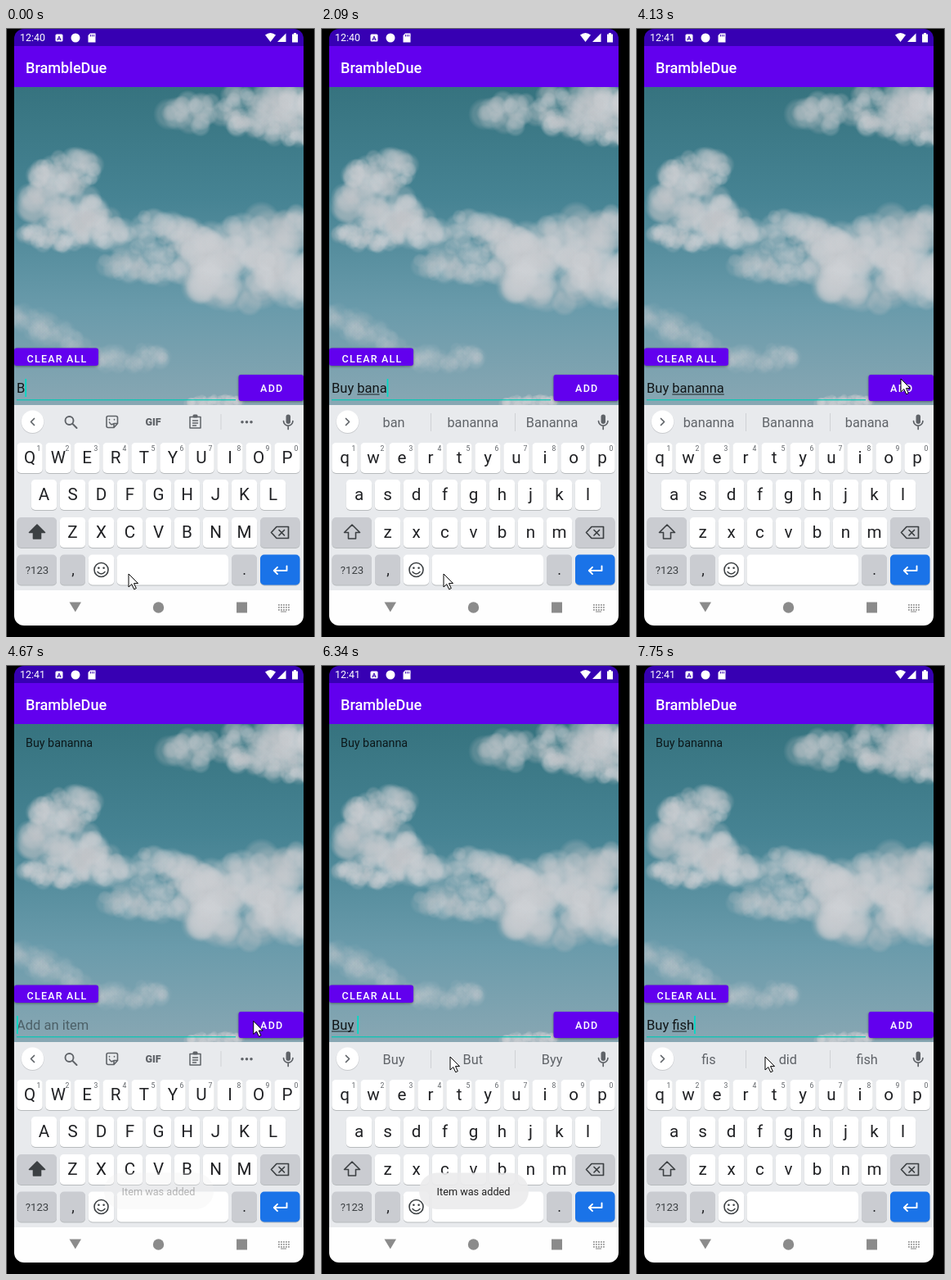
An HTML page with a canvas that plays this animation: 378 px wide and 743 px high, repeating every 8 s.

```html
<!DOCTYPE html>
<html lang="en">
<head>
<meta charset="utf-8">
<title>To-do list demo</title>
<style>
html, body { margin: 0; width: 100%; height: 100%; overflow: hidden; background: #000; }
canvas { display: block; width: 378px; height: 743px; }
</style>
</head>
<body>
<canvas id="stage"></canvas>
<script>
const W = 378, H = 743, LOOP = 8000;
const dpr = window.devicePixelRatio || 1;
const FONT = 'Roboto, "Open Sans", sans-serif';
const PURPLE = '#6200ee', TEAL = '#03dac5', INK = '#202124', DARK = '#3c4043', GREY = '#5f6368';

function setup(canvas) {
  canvas.width = W * dpr;
  canvas.height = H * dpr;
  const ctx = canvas.getContext('2d');
  ctx.scale(dpr, dpr);
  return ctx;
}
let c = setup(document.getElementById('stage'));

const clamp = v => Math.min(1, Math.max(0, v));
const ease = v => { v = clamp(v); return v * v * (3 - 2 * v); };

// Typing: each burst starts from a base text and adds one letter per step
const bursts = [
  { from: 0, step: 320, base: '', add: 'Buy ' },
  { from: 1400, step: 150, base: 'Buy ', add: 'B' },
  { from: 1700, step: 130, base: 'Buy ', add: 'bana' },
  { from: 2460, step: 150, base: 'Buy bana', add: 'nn' },
  { from: 3030, step: 150, base: 'Buy banann', add: 'a' },
  { from: 4400, step: 150, base: '', add: '' },
  { from: 5360, step: 150, base: '', add: 'B' },
  { from: 6040, step: 150, base: 'B', add: 'uy ' },
  { from: 7030, step: 240, base: 'Buy ', add: 'fish' }
];
const LAG = 130, ADDED = 4400;

function typed(t) {
  const b = bursts.findLast(b => b.from <= t);
  return b ? b.base + b.add.slice(0, 1 + Math.floor((t - b.from) / b.step)) : '';
}

// Suggestions: the word itself, then known words for its first letter
const known = {
  B: ['Buy', 'But', 'Byy'],
  b: ['bananna', 'Bananna', 'banana'],
  f: ['did', 'fish', 'for']
};
function suggest(value) {
  const word = value.split(' ').pop();
  if (!word) return ['a', 'milk', 'bananna'];
  return [word, ...known[word[0]].filter(w => w !== word)].slice(0, 3);
}

function rect(x, y, w, h, color) {
  c.fillStyle = color;
  c.fillRect(x, y, w, h);
}
function box(x, y, w, h, r, color) {
  c.beginPath();
  c.roundRect(x, y, w, h, r);
  c.fillStyle = color;
  c.fill();
}
function disc(x, y, r, color) {
  c.beginPath();
  c.arc(x, y, r, 0, 7);
  c.fillStyle = color;
  c.fill();
}
function ring(x, y, r, color, width) {
  c.beginPath();
  c.arc(x, y, r, 0, 7);
  c.strokeStyle = color;
  c.lineWidth = width;
  c.stroke();
}
function text(s, x, y, size, color, align = 'left', weight = 400, spacing = 0) {
  c.font = `${weight} ${size}px ${FONT}`;
  c.letterSpacing = spacing + 'px';
  c.textAlign = align;
  c.fillStyle = color;
  c.fillText(s, x, y);
  c.letterSpacing = '0px';
}
function fillPath(d, color) {
  c.fillStyle = color;
  c.fill(new Path2D(d));
}
function line(d, color, width = 1.7) {
  c.strokeStyle = color;
  c.lineWidth = width;
  c.stroke(new Path2D(d));
}

let seed = 7;
function random() {
  seed = seed * 16807 % 2147483647;
  return seed / 2147483647;
}

// Scatters soft puffs along a line, thinner towards its ends
function cloud(x0, y0, x1, y1, half, density) {
  const count = 14 * Math.hypot(x1 - x0, y1 - y0) / half;
  for (let i = 0; i < count; i++) {
    const u = random(), r = half * (.3 + .4 * random());
    const reach = half * (.35 + .65 * Math.sqrt(Math.sin(Math.PI * u))) - r * .6;
    const x = x0 + (x1 - x0) * u;
    const y = y0 + (y1 - y0) * u + (random() * 2 - 1) * Math.max(0, reach);
    const tone = 188 + 24 * random();
    const rgb = `${tone},${tone + 3},${tone + 7}`;
    const g = c.createRadialGradient(x, y, 0, x, y, r);
    g.addColorStop(0, `rgba(${rgb},${density})`);
    g.addColorStop(.7, `rgba(${rgb},${density * .8})`);
    g.addColorStop(1, `rgba(${rgb},0)`);
    disc(x, y, r, g);
  }
}

function paintSky() {
  const sheet = document.createElement('canvas'), stage = c;
  c = setup(sheet);
  const g = c.createLinearGradient(0, 72, 0, 460);
  g.addColorStop(0, '#36737f');
  g.addColorStop(.35, '#468393');
  g.addColorStop(.7, '#6a9bab');
  g.addColorStop(1, '#88a7b3');
  rect(0, 72, W, 388, g);
  cloud(200, 105, 390, 94, 30, .3);
  cloud(275, 112, 390, 132, 20, .2);
  cloud(35, 182, 110, 172, 27, .3);
  cloud(28, 212, 112, 222, 34, .33);
  cloud(22, 252, 95, 255, 20, .24);
  cloud(85, 240, 255, 262, 28, .26);
  cloud(120, 288, 260, 292, 24, .18);
  cloud(225, 272, 400, 248, 40, .36);
  cloud(232, 310, 400, 305, 38, .36);
  cloud(5, 350, 95, 388, 22, .09);
  cloud(95, 402, 195, 402, 18, .1);
  cloud(222, 458, 288, 455, 9, .3);
  c = stage;
  return sheet;
}
const sky = paintSky();

function bars(t) {
  rect(10, 0, 354, 22, '#3700b3');
  rect(10, 22, 354, 50, PURPLE);
  text(t < 2460 ? '12:40' : '12:41', 17, 16, 12.4, '#fff');
  box(60.5, 7.5, 9, 9, 1.5, '#fff');
  text('A', 65, 15, 8, '#3700b3', 'center', 700);
  disc(85, 12, 5.5, '#fff');
  fillPath('M103 6.5h6.5v11h-9v-8.5z', '#fff');
  line('M103.5 8v2.5M105.5 8v2.5M107.5 8v2.5', '#3700b3', .9);
  fillPath('M317 8.5Q323.5 3.5 330 8.5L323.5 17z', '#fff');
  fillPath('M332 17L342.5 6.5V17z', '#fff');
  fillPath('M350 7.5h2v-1.5h3v1.5h2v10h-7z', '#fff');
  text('BrambleDue', 24, 55, 18.1, '#fff', 'left', 500);
}

function button(label, x, y, w, h, base) {
  c.save();
  c.shadowColor = 'rgba(0,0,0,.4)';
  c.shadowBlur = 3 * dpr;
  c.shadowOffsetY = dpr;
  box(x, y, w, h, 3, PURPLE);
  c.restore();
  text(label, x + w / 2 + 1, base, 12.5, '#fff', 'center', 500, 1.2);
}

function field(t, value, seen) {
  const item = clamp((t - ADDED) / 250);
  text('Buy bananna', 24, 100, 14.3, `rgba(0,0,0,${item * .8})`);
  rect(13, 453, 268, 1.4, 'rgba(3,200,182,.85)');
  text(value || 'Add an item', 13, 445, 16.5, value ? 'rgba(0,0,0,.87)' : 'rgba(0,0,0,.42)');
  const width = s => c.measureText(s).width;
  if (value.startsWith(seen) && !seen.endsWith(' ')) {
    const start = width(seen.slice(0, seen.lastIndexOf(' ') + 1));
    rect(13 + start, 446.5, width(seen) - start, 1, 'rgba(0,0,0,.8)');
  }
  const idle = t > 3590 && t < ADDED;
  if (!idle) rect(13 + width(value), 428, 1.8, 22, TEAL);
}

function key(x, y, w, color = '#fff') {
  box(x, y + 1, w, 37, 5, 'rgba(60,64,67,.28)');
  box(x, y, w, 37, 5, color);
}

function letters(row, x, y, caps, digits) {
  [...row].forEach((ch, i) => {
    const mid = x + i * 35;
    key(mid - 15.7, y, 31.4);
    text(caps ? ch : ch.toLowerCase(), mid, y + 25, 20.6, INK, 'center');
    if (digits) text((i + 1) % 10, mid + 11, y + 10, 8.6, GREY, 'center');
  });
}

function toolbar() {
  ring(77.5, 479, 5, GREY, 1.9);
  line('M81.5 483L86.5 488', GREY, 2);
  line('M125 473.5h9.5q2 0 2 2v7l-4.5 5h-7q-2 0-2-2v-10q0-2 2-2zM136 482.5h-4v4.5M126.5 481q2 4 4.5 2M126.5 477.5v.5M132.5 477.5v.5', GREY, 1.6);
  text('GIF', 180, 484.5, 12.5, GREY, 'center', 900);
  line('M225 474.5h13v13.5h-13zM228.5 479h6M228.5 482h6M228.5 485h4', GREY, 1.5);
  box(228.5, 471.5, 6, 4, 1.5, GREY);
  rect(262.5, 471, 1, 19, '#cfd1d5');
  for (let i = -1; i < 2; i++) disc(294.5 + i * 5.5, 480.7, 1.8, GREY);
}

function keyboard(seen) {
  const caps = !seen, grey = '#caccd1';
  rect(10, 460, 354, 226, '#e8eaed');
  c.lineCap = c.lineJoin = 'round';
  disc(32.5, 481, 14, 'rgba(60,64,67,.18)');
  disc(32.5, 480.3, 13.7, '#fff');
  line(caps ? 'M34.5 476.5l-4 4 4 4' : 'M30.5 476.5l4 4-4 4', GREY);
  if (caps) toolbar();
  else suggest(seen).forEach((w, i) => {
    text(w, 89 + i * 96.8, 487, 16.3, GREY, 'center');
    if (i) rect(31 + i * 103, 470, 1, 22, '#cfd1d5');
  });
  box(342.5, 471.5, 5.5, 11.5, 2.75, GREY);
  line('M339.5 479.5a5.7 5.7 0 0 0 11.4 0M345.2 485.5v4', GREY);

  letters('QWERTYUIOP', 29, 506, caps, true);
  letters('ASDFGHJKL', 46.5, 551, caps);
  letters('ZXCVBNM', 81.5, 597, caps);

  key(13.5, 597, 48.5, grey);
  key(311, 597, 48.5, grey);
  key(13.5, 642.5, 48.5, grey);
  key(66, 642.5, 31, grey);
  key(100.8, 642.5, 31.4);
  key(135.5, 642.5, 136.5);
  key(276, 642.5, 31, grey);
  key(311, 642.5, 48.5, '#1a73e8');

  const shift = 'M38 606l9.5 9.5h-5v7.5h-9v-7.5h-5z';
  if (caps) fillPath(shift, DARK);
  line(shift, DARK, 1.6);
  line('M331 608.5h14.5v14h-14.5l-6.5-7zM334 612.5l6.5 6.5M340.5 612.5l-6.5 6.5', DARK);
  text('?123', 38, 665.5, 13.2, DARK, 'center');
  text(',', 82, 667, 18, INK, 'center');
  text('.', 291.5, 667, 18, INK, 'center');
  ring(116.5, 661, 8.5, DARK, 1.6);
  disc(113.4, 658.7, 1.3, DARK);
  disc(119.6, 658.7, 1.3, DARK);
  line('M112 663.5q4.5 5 9 0', DARK, 1.5);
  line('M343.5 656.5v5.5h-15.5M332 657.8l-4.2 4.2 4.2 4.2', '#fff', 1.9);
}

function navBar() {
  const tone = '#8b8b8b';
  rect(10, 686, 354, 43, '#fefefe');
  fillPath('M77.5 700.5h14.5l-7.2 12z', tone);
  disc(186.5, 707, 6.7, tone);
  rect(282, 700.5, 13, 13, tone);
  for (let i = 0; i < 15; i++) {
    rect(333 + i % 5 * 3, 703 + Math.floor(i / 5) * 3, 1.8, 1.8, '#9a9a9a');
  }
  rect(336, 711.5, 7, 1.2, '#9a9a9a');
}

function toast(t) {
  c.save();
  c.globalAlpha = clamp((t - 4530) / 450) * clamp((7000 - t) / 500);
  box(120, 619.5, 134, 44.5, 22, 'rgba(235,236,237,.9)');
  text('Item was added', 186.5, 647, 12.7, '#222', 'center');
  c.restore();
}

// Goes from the space bar to the button, then back to the keyboard
function pointer(t) {
  const there = ease((t - 3590) / 540), back = ease((t - 4550) / 540);
  c.save();
  c.translate(150 + 174 * there - 166 * back, 666 - 238 * there + 50 * back);
  c.lineJoin = 'miter';
  const d = 'M0 0V16L3.8 12.6L6.7 18.8L9.3 17.6L6.5 11.6H11.5Z';
  fillPath(d, '#fff');
  line(d, '#000', 1);
  c.restore();
}

function draw(t) {
  const value = typed(t), seen = typed(t - LAG);
  rect(0, 0, W, H, '#6b6b6b');
  rect(1, 1, W - 2, H - 1, '#000');
  c.save();
  c.beginPath();
  c.roundRect(10, 1, 354, 728, 12);
  c.clip();
  c.drawImage(sky, 0, 0, W, H);
  bars(t);
  button('CLEAR ALL', 10, 390.5, 103, 21.5, 407.6);
  button('ADD', 284.5, 423, 79.5, 32, 444);
  if (t > 4280 && t < 4520) box(284.5, 423, 79.5, 32, 3, 'rgba(255,255,255,.2)');
  field(t, value, seen);
  keyboard(seen);
  navBar();
  toast(t);
  c.restore();
  pointer(t);
}

const start = performance.now();
function tick() {
  draw((performance.now() - start) % LOOP);
  requestAnimationFrame(tick);
}
tick();
</script>
</body>
</html>
```
